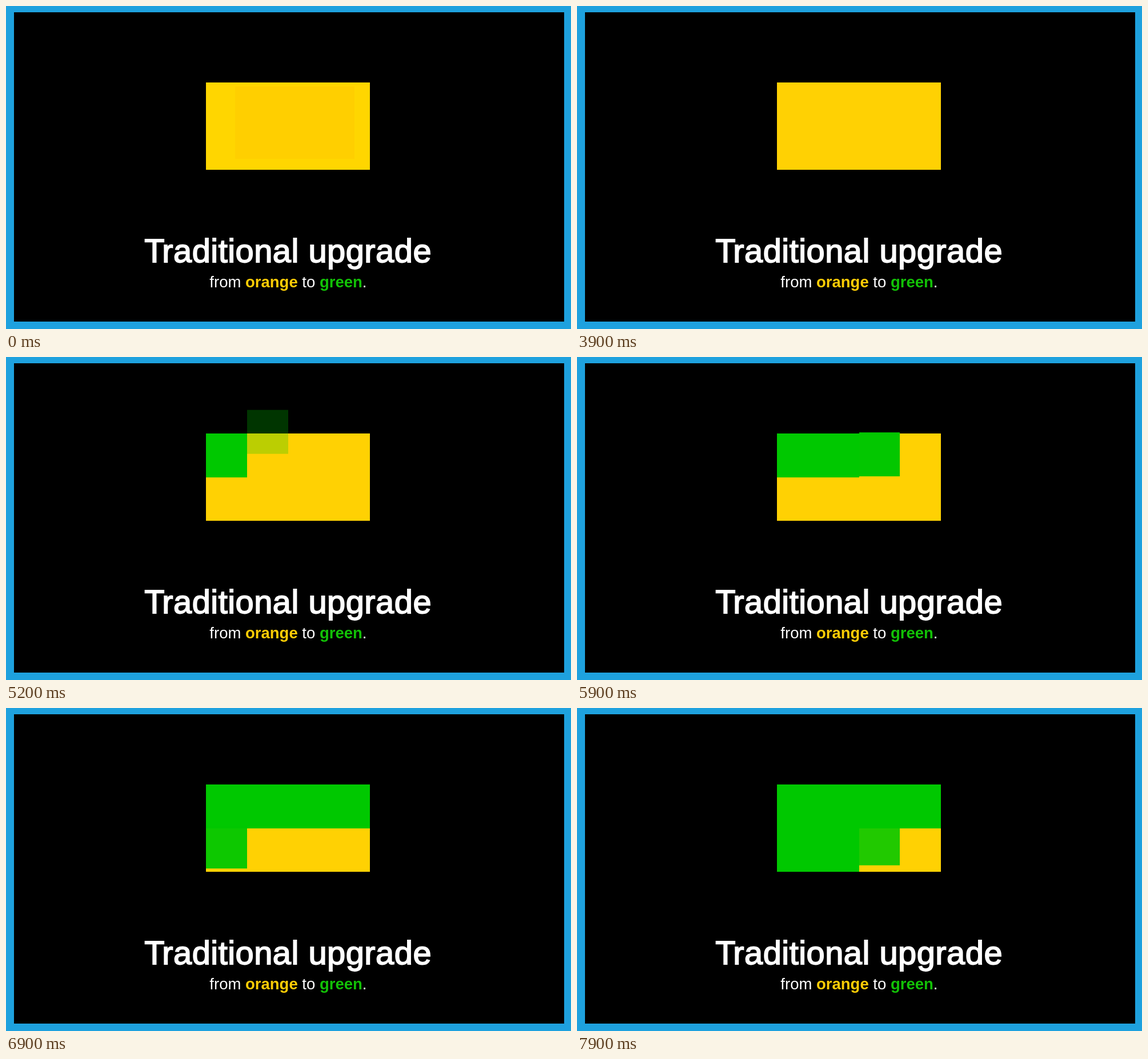
Write an HTML page that moves like this. It is 989x566 px and loops after 8000 ms.

```html
<!DOCTYPE html>
<html lang="en">
<head>
<meta charset="utf-8">
<title>Traditional upgrade</title>
<style>
  html, body { margin: 0; width: 100%; height: 100%; overflow: hidden; background: #1ea1de; }
  svg { display: block; width: 989px; height: 566px; }
  text { font-family: "Liberation Sans", Arial, sans-serif; fill: #fff; text-anchor: middle; }
  .title { font-size: 57.8px; letter-spacing: 0.5px; stroke: #fff; stroke-width: 1.8px; }
  .subtitle { font-size: 27.5px; }
  .orange { fill: #ffcd05; font-weight: bold; }
  .green { fill: #12c106; font-weight: bold; }
</style>
</head>
<body>
<svg viewBox="0 0 989 566">
  <rect width="989" height="566" fill="#1ea1de"/>
  <rect x="14" y="11" width="963" height="542"/>
  <rect x="350" y="134" width="287" height="153" fill="#ffd103"/>
  <g id="ghost">
    <rect x="350" y="134" width="287" height="153" fill="#ffd700"/>
    <rect x="401" y="141" width="209" height="127" fill="#ffcf00"/>
  </g>
  <g id="tiles" fill="#00c800"></g>
  <text class="title" x="493.6" y="449.4" dx="0 -2.5">Traditional upgrade</text>
  <text class="subtitle" x="493.9" y="493">from <tspan class="orange">orange</tspan> to <tspan class="green">green</tspan>.</text>
</svg>
<script>
  const LOOP = 8000, FIRST_DROP = 4590, INTERVAL = 515, DURATION = 320, HEIGHT = 52;
  const ghost = document.getElementById('ghost');
  const group = document.getElementById('tiles');
  const clamp = v => Math.min(1, Math.max(0, v));
  const columnX = i => 350 + Math.round(i * 71.75);
  const rowY = i => 134 + Math.round(i * 76.5);

  const tiles = Array.from({ length: 8 }, (_, i) => {
    const col = i % 4, row = Math.floor(i / 4);
    const el = document.createElementNS('http://www.w3.org/2000/svg', 'rect');
    el.setAttribute('x', columnX(col));
    el.setAttribute('width', columnX(col + 1) - columnX(col));
    el.setAttribute('height', rowY(row + 1) - rowY(row));
    group.append(el);
    return { el, y: rowY(row), start: FIRST_DROP + i * INTERVAL };
  });

  function draw(now) {
    const t = now % LOOP;
    ghost.setAttribute('opacity', clamp(1 - t / 500));
    for (const { el, y, start } of tiles) {
      const p = clamp((t - start) / DURATION);
      const left = (1 + Math.cos(Math.PI * p)) / 2;
      el.setAttribute('y', y - HEIGHT * left);
      el.setAttribute('opacity', 1 - left ** 1.35);
    }
    requestAnimationFrame(draw);
  }
  draw(0);
</script>
</body>
</html>
```
